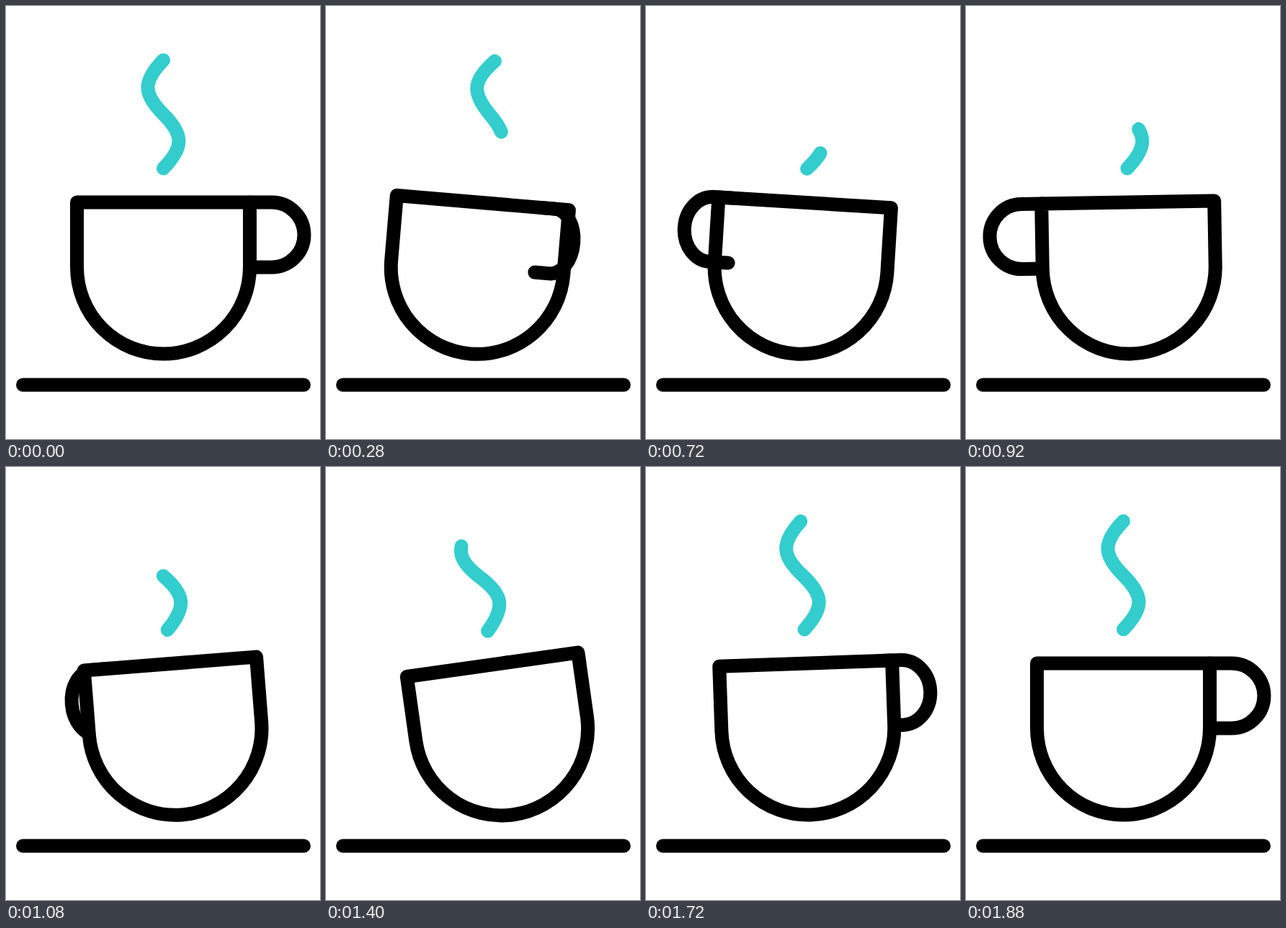
An HTML page that plays this animation: 436x600 px, repeating every 2 s.

```html
<!DOCTYPE html>
<html lang="en">
<head>
<meta charset="utf-8">
<title>Rocking cup</title>
<style>
  html, body { margin: 0; width: 100%; height: 100%; overflow: hidden; background: #fff; }
  svg { display: block; width: 100%; height: 100%; }
  path { fill: none; stroke: #000; stroke-width: 19; stroke-linecap: round; stroke-linejoin: round; }
  #cup { fill: #fff; }
  .steam { stroke: #33cdcd; }
</style>
</head>
<body>
<svg viewBox="0 0 436 600">
  <path d="M23.5 525H413.5"/>
  <!-- origin: middle of the rim -->
  <g id="body">
    <path class="steam" id="rising" pathLength="1" d="M0-197Q-21.5-175-21.5-159Q-21.5-143.5 0-122T21.5-85Q21.5-69 0-47"/>
    <path class="steam" id="growing" pathLength="1" transform="rotate(180 0 -122)"/>
    <path id="cup" d="M-120 0H120V90A120 120 0 0 1-120 90Z"/>
    <path id="handle"/>
  </g>
</svg>
<script>
const LOOP = 2000, STEP = 40, START = 80, LEFT = 400, RIGHT = 1400, END = 1880;
const [body, rising, growing, cup, handle] =
  ['body', 'rising', 'growing', 'cup', 'handle'].map(id => document.getElementById(id));
growing.setAttribute('d', rising.getAttribute('d'));

const progress = (t, from, to) => Math.min(1, Math.max(0, (t - from) / (to - from)));
const sine = u => (1 - Math.cos(Math.PI * u)) / 2;
const swing = (t, from, to) => sine(progress(t, from, to));

// Rest, lean to one side, roll to the other, return to rest.
function sway(t, first, second) {
  return first * swing(t, START, LEFT)
    + (second - first) * swing(t, LEFT, RIGHT)
    - second * swing(t, RIGHT, END);
}

function reveal(path, length) {
  path.style.display = length > 0 ? '' : 'none';
  path.setAttribute('stroke-dasharray', length < 1 ? `${length} 2` : 'none');
}

// The handle circles the cup: in front first, then behind it.
function drawHandle(turn) {
  const c = Math.cos(turn * Math.PI / 180);
  const near = 120 * c, far = 150.5 * c;
  handle.setAttribute('d',
    `M${near} 0H${far}A${45 * Math.abs(c)} 45 0 0 ${c > 0 ? 1 : 0} ${far} 90H${near}`);
  body.insertBefore(handle, turn < 180 ? null : cup);
}

function draw(t) {
  const tilt = sway(t, 7, -8);
  const x = 218.5 + sway(t, -1, 12.6);
  const y = 272 + 1.8 * (tilt / 8) ** 2;
  body.setAttribute('transform', `translate(${x} ${y}) rotate(${tilt})`);

  // A quick quarter turn, then gradually slower.
  drawHandle(96.5 * progress(t, START, 480)
    + 127.5 * progress(t, 480, 1080)
    + 136 * progress(t, 1080, END + 10));

  reveal(rising, 1 - progress(t, START, 664));
  reveal(growing, progress(t, 550, 1610));
}

function frame() {
  const t = performance.now() % LOOP;
  draw(Math.floor(t / STEP) * STEP);
  requestAnimationFrame(frame);
}
frame();
</script>
</body>
</html>
```
